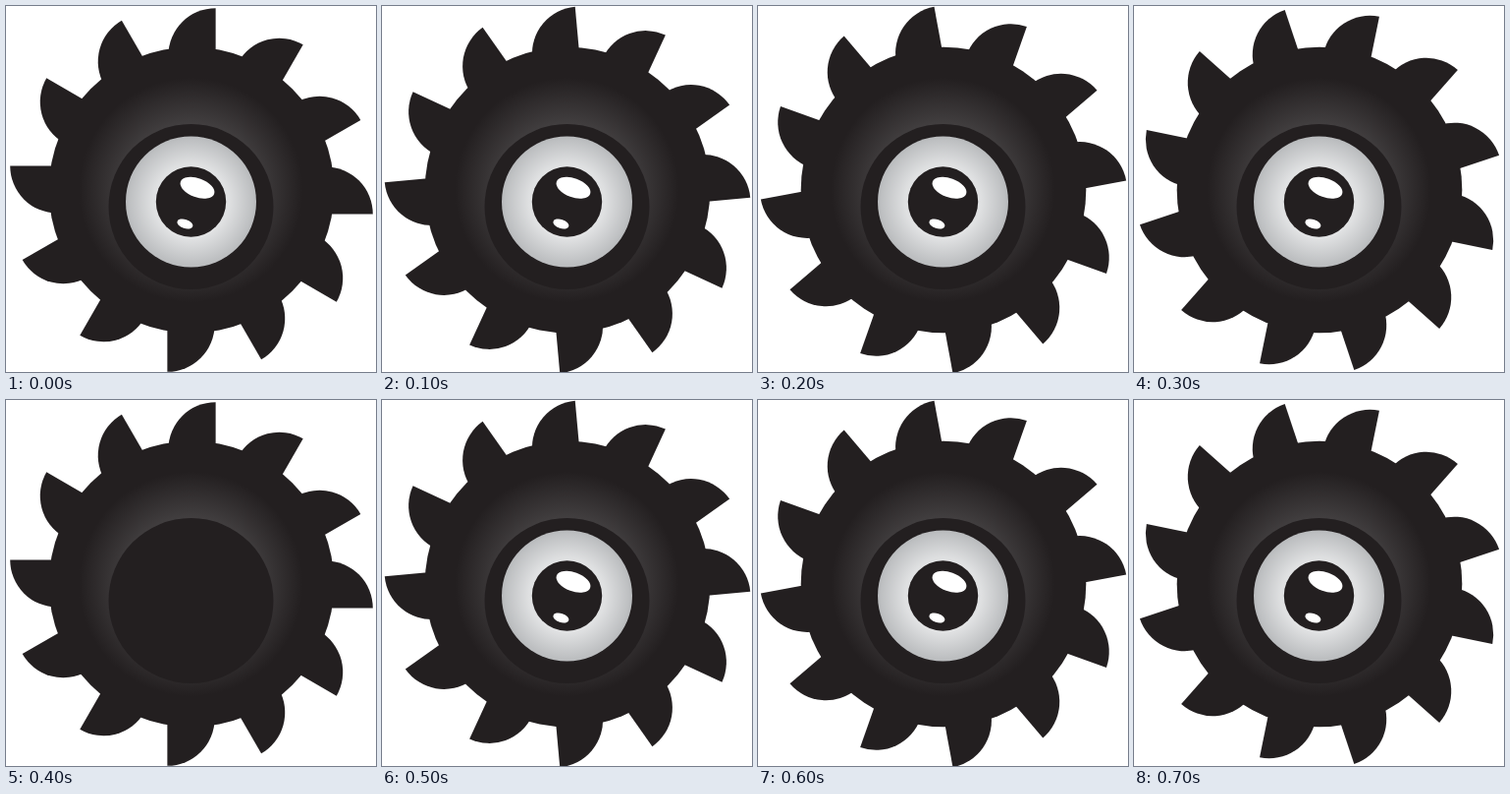
These frames come from a looping animation (377 px wide and 372 px high, 800 ms). An HTML page:

```html
<!DOCTYPE html>
<html lang="en">
<head>
<meta charset="utf-8">
<title>Blinking saw blade</title>
<style>
  html, body { margin: 0; width: 100%; height: 100%; overflow: hidden; background: #fff; }
  svg { display: block; width: 100vw; height: 100vh; }
</style>
</head>
<body>
<svg viewBox="0 0 377 372">
  <defs>
    <radialGradient id="glow" gradientUnits="userSpaceOnUse" cx="188.5" cy="187" r="114">
      <stop offset="0" stop-color="#6e6c6d"/>
      <stop offset="1" stop-color="#231f20"/>
    </radialGradient>
    <radialGradient id="iris">
      <stop offset=".5" stop-color="#e6e7e8"/>
      <stop offset="1" stop-color="#b9bbbd"/>
    </radialGradient>
    <path id="tooth" d="M24.6-184.8V-130H-23.6V-137A48.2 48 0 0 1 24.6-184.8Z"/>
  </defs>
  <g id="blade" fill="#231f20"></g>
  <circle cx="189" cy="187" r="145.3" fill="url(#glow)"/>
  <circle cx="188.5" cy="204" r="84" fill="#231f20"/>
  <g id="eye">
    <circle cx="188.5" cy="199" r="66.5" fill="url(#iris)"/>
    <circle cx="188.5" cy="199" r="35.7" fill="#231f20"/>
    <g fill="#fff">
      <ellipse rx="18.2" ry="9.6" transform="translate(195 184.7) rotate(20)"/>
      <ellipse rx="8.3" ry="4.6" transform="translate(182.4 221.5) rotate(18)"/>
    </g>
  </g>
</svg>
<script>
  const blade = document.getElementById('blade');
  const eye = document.getElementById('eye');
  const angles = [0, -5.2, -10.5, -18.5];

  for (let a = 0; a < 360; a += 30) {
    blade.innerHTML += `<use href="#tooth" transform="rotate(${a})"/>`;
  }

  function draw(now) {
    const step = Math.floor(now / 100) % 8;
    blade.setAttribute('transform', `translate(189 187) rotate(${angles[step % 4]})`);
    eye.style.display = step === 4 ? 'none' : '';
    requestAnimationFrame(draw);
  }
  draw(0);
</script>
</body>
</html>
```
